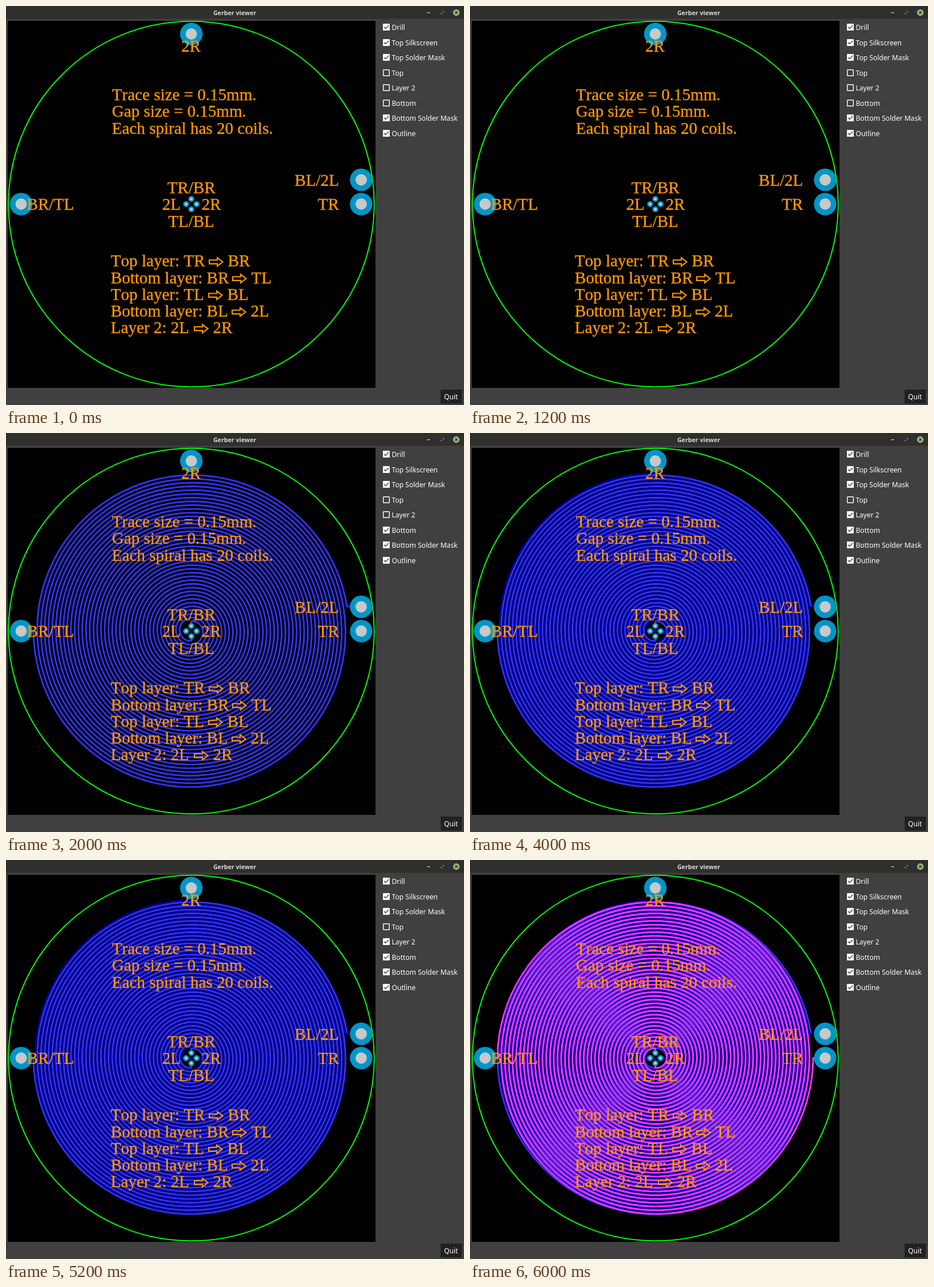
An HTML page for the animation above (8 s loop, 802x699 px).

```html
<!DOCTYPE html>
<html lang="en">
<head>
<meta charset="utf-8">
<title>Gerber viewer</title>
<style>
  html, body { margin: 0; width: 100%; height: 100%; overflow: hidden; background: #404040; }
  svg { display: block; }
  .ui { font: 12.1px "Noto Sans", "Open Sans", sans-serif; fill: #fff; }
  .title { font: bold 10.67px "Noto Sans", "Open Sans", sans-serif; fill: #d8d8d8; text-anchor: middle; }
  .silk { font: 29.1px "Liberation Serif", "Times New Roman", serif; font-kerning: none;
          fill: #ff9900; stroke: #ff9900; stroke-width: .35; }
  .arrow { fill: none; stroke: #ff9900; stroke-width: 2.1; }
  .trace { fill: none; stroke-width: 2.95; stroke-linejoin: round; stroke-linecap: round; }
</style>
</head>
<body>
<svg id="stage" width="802" height="699" viewBox="0 0 802 699"></svg>
<script>
const stage = document.getElementById('stage');
const CX = 324.5, CY = 347, TURN = 2 * Math.PI;
const OUTER = 276.5, PITCH = 13.14, TURNS = 19.75, HOLE = 9.1;

function add(parent, tag, attrs, text) {
  const el = document.createElementNS('http://www.w3.org/2000/svg', tag);
  for (const key in attrs) el.setAttribute(key, attrs[key]);
  if (text) el.textContent = text;
  parent.appendChild(el);
  return el;
}
const rect = (x, y, width, height, fill, rx = 0) => add(stage, 'rect', { x, y, width, height, fill, rx });
const circle = (cx, cy, r, fill) => add(stage, 'circle', { cx, cy, r, fill });
const text = (cls, x, y, str) => add(stage, 'text', { class: cls, x, y }, str);

const polar = (r, a) => (CX + r * Math.cos(a)).toFixed(2) + ' ' + (CY + r * Math.sin(a)).toFixed(2);

// One arm: outer pad, spiral inwards, inner pad. Angles are in turns.
function arm(padX, padY, from, dir, skip = 0) {
  const angle = u => (from + dir * u) * TURN;
  let d = `M${padX} ${padY}`;
  for (let u = skip; u < TURNS; u += 1 / 90) d += 'L' + polar(OUTER - u * PITCH, angle(u));
  const end = angle(TURNS);
  return d + 'L' + polar(OUTER - TURNS * PITCH, end) + 'L' + polar(HOLE, end);
}
const layer = (stroke, ...paths) => add(stage, 'path', { class: 'trace', stroke, d: paths.join('') });

// Window
rect(0, 0, 802, 699, '#404040');
rect(0, 0, 802, 22.5, '#2f2f2e');
text('title', 400.5, 16, 'Gerber viewer');
rect(737.5, 11, 5, 1.4, '#c8c8c8');
add(stage, 'path', { d: 'M764.5 9h2.5v2.5zM761.5 11.5v2.5h2.5z', fill: '#b8b8b8' });
circle(788.5, 11.5, 5.7, '#98b87a');
add(stage, 'path', { d: 'M786.3 9.3l4.4 4.4m0-4.4l-4.4 4.4', stroke: '#2f2f2e', 'stroke-width': 1.4 });
rect(3, 26, 644, 643, '#000');
rect(761, 672, 37.5, 24.5, '#212121');
text('ui', 767, 689, 'Quit');

// Board
add(stage, 'circle', { cx: CX, cy: CY, r: 320.3, fill: 'none', stroke: '#00ff00', 'stroke-width': 2 });
const right = 622, left = 26.5, upper = 304.5;
const bottom = layer('#3232ff', arm(left, CY, .5, -1), arm(right, upper, 0, -1, .0249));
const middle = layer('#000096', arm(CX, 49, -.25, -1), arm(right, upper, .25, -1, .275),
  `M${CX - HOLE} ${CY}H${CX + HOLE}`);
const top_ = layer('#ff32ff', arm(right, CY, 0, 1), arm(left, CY, .5, 1));

const pads = [[CX, 49], [left, CY], [right, CY], [right, upper]];
const vias = [[0, -HOLE], [0, HOLE], [-HOLE, 0], [HOLE, 0]].map(([x, y]) => [CX + x, CY + y]);
for (const [x, y] of pads) circle(x, y, 19.7, '#0096c8');
for (const [x, y] of vias) circle(x, y, 5.2, '#0096c8');

// Silkscreen
const LINE = 29.25;
['Trace size = 0.15mm.', 'Gap size = 0.15mm.', 'Each spiral has 20 coils.']
  .forEach((str, i) => text('silk', 185.5, 165 + i * LINE, str));
[['Top layer: TR', 355, 'BR'], ['Bottom layer: BR', 396, 'TL'], ['Top layer: TL', 354, 'BL'],
 ['Bottom layer: BL', 395, '2L'], ['Layer 2: 2L', 329, '2R']].forEach(([from, x, to], i) => {
  const y = 456.3 + i * LINE;
  text('silk', 183.5, y, from);
  add(stage, 'path', { class: 'arrow', d: `M${x + 1} ${y - 11.3}h14v-4l9.5 7.3l-9.5 7.3v-4h-14z` });
  text('silk', x + 33.5, y, to);
});
[['2R', 307, 80], ['TR/BR', 282.5, 328], ['2L', 273.5, 357], ['2R', 342.5, 357], ['TL/BL', 284, 386.5],
 ['BL/2L', 505.5, 315], ['TR', 546, 357], ['BR/TL', 36.5, 357]]
  .forEach(([str, x, y]) => text('silk', x, y, str));

for (const [x, y] of pads) circle(x, y, 9.9, '#c8c8c8');
for (const [x, y] of vias) circle(x, y, 2.5, '#c8c8c8');

// Layer list
const ticks = ['Drill', 'Top Silkscreen', 'Top Solder Mask', 'Top', 'Layer 2', 'Bottom',
  'Bottom Solder Mask', 'Outline'].map((name, i) => {
  const y = 37 + i * 26.57, cy = Math.round(y);
  add(stage, 'rect', { x: 660.7, y: cy - 5.3, width: 10.6, height: 10.6, rx: .8,
    fill: 'none', stroke: '#fff', 'stroke-width': 1.4 });
  text('ui', 675.5, cy + 4.6, name);
  const tick = add(stage, 'g', {});
  add(tick, 'rect', { x: 660, y: cy - 6, width: 12, height: 12, rx: 1.3, fill: '#fff' });
  add(tick, 'path', { d: `M661.9 ${cy - .3}l2.8 2.8l5.4-5.4`, fill: 'none', stroke: '#404040', 'stroke-width': 1.4 });
  return tick;
});

const show = (el, on) => el.setAttribute('visibility', on ? 'visible' : 'hidden');
const start = performance.now();
function draw(now) {
  const step = Math.floor(Math.max(0, now - start) % 8000 / 2000);
  [[bottom, 5], [middle, 4], [top_, 3]].forEach(([path, row], i) => {
    show(path, step > i);
    show(ticks[row], step > i);
  });
  requestAnimationFrame(draw);
}
draw(start);
</script>
</body>
</html>
```
